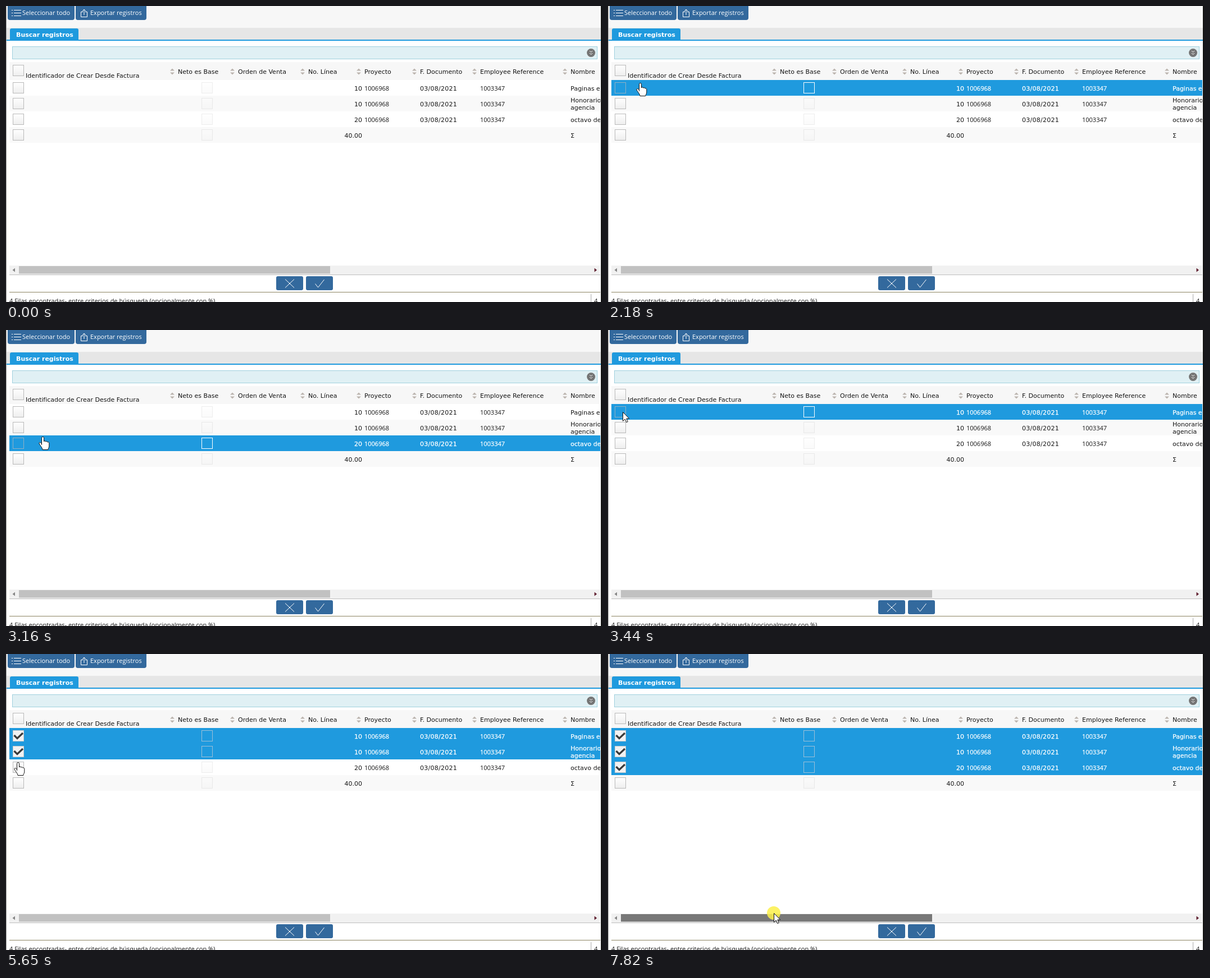
Write an HTML page that moves like this. It is 1061x528 px and loops after 8000 ms.

```html
<!DOCTYPE html>
<html lang="es">
<head>
<meta charset="utf-8">
<title>Buscar registros</title>
<style>
html, body { margin: 0; width: 100%; height: 100%; overflow: hidden; background: #fff; }
svg { display: block; width: 1061px; height: 528px; }
text { font: 11px "DejaVu Sans", sans-serif; fill: #151515; white-space: pre; }
text.ui { font-family: "Open Sans", sans-serif; }
text.white { fill: #fff; }
text.bold { font-weight: bold; }
.line { fill: none; stroke: #fff; }
.box { fill: url(#shade); stroke: #b9b9b9; }
.faint { opacity: .25; }
.check { fill: none; stroke: #3a3a3a; stroke-width: 3.2; visibility: hidden; }
.lit .bg { fill: #1f9ade; }
.lit text { fill: #fff; stroke: #fff; stroke-width: .25px; }
.lit .box { fill: none; stroke: #8fb0c4; }
.lit .faint { opacity: 1; stroke: #9cc0d8; }
.hover:not(.checked) .faint { stroke: #fff; }
.checked .main { fill: #f2f2f2; stroke: #ccc; }
.checked .check { visibility: visible; }
</style>
</head>
<body>
<svg viewBox="0 0 1061 528">
  <defs>
    <linearGradient id="shade" x2="0" y2="1">
      <stop stop-color="#fff"/><stop offset="1" stop-color="#eee"/>
    </linearGradient>
    <clipPath id="view"><path d="M0 0H1058V528H0Z"/></clipPath>
  </defs>
  <rect width="1061" height="528" fill="#fff"/>
  <rect width="1061" height="39" fill="#f7f7f7"/>
  <rect y="39" width="1061" height="22" fill="#e6e6e6"/>
  <rect y="60" width="1059" height="2" fill="#1f9ade"/>

  <g fill="#33699d">
    <rect x="3" y="-5" width="119" height="30" rx="4"/>
    <rect x="124" y="-5" width="126" height="30" rx="4"/>
    <rect x="481" y="482" width="48" height="25" rx="3"/>
    <rect x="534" y="482" width="48" height="25" rx="3"/>
  </g>
  <path class="line" d="M10 7.5h2m2 0h13M10 12.5h2m2 0h13M10 17.5h2m2 0h13"/>
  <path class="line" d="M137 10.5h-3.5v9h11v-9H141M139 16V6M135.5 9.5L139 6l3.5 3.5"/>
  <path class="line" d="M497 487.5l16 15m0-15l-16 15M550.5 495.5l5 6.5 11-14"/>
  <text class="ui white" x="29" y="16">Seleccionar todo</text>
  <text class="ui white" x="150" y="16">Exportar registros</text>

  <path d="M7 61V43q0-3 3-3H126q3 0 3 3V61Z" fill="#1f9ade"/>
  <text class="white bold" x="18" y="55">Buscar registros</text>
  <rect x="11.5" y="72.5" width="1041" height="22" fill="#e0f0f4" stroke="#a0d0de"/>
  <circle cx="1041.5" cy="83.5" r="7.5" fill="#757575"/>
  <path class="line" d="M1039 80l2.5 2.5 2.5-2.5m-5 4l2.5 2.5 2.5-2.5"/>

  <g id="table" clip-path="url(#view)"></g>

  <rect x="6" y="463" width="1052" height="16" fill="#f1f1f1"/>
  <rect id="thumb" x="23" y="464" width="554" height="13.5"/>
  <path d="M16 467.5v7l-4.5-3.5Z" fill="#858585"/>
  <path d="M1047.5 467.5v7l4.5-3.5Z" fill="#602030"/>
  <path d="M6 479.5H1058" stroke="#bdbdbd"/>
  <path d="M6 510.5H1058" stroke="#8b8460"/>
  <path d="M1041.5 514v14" stroke="#aaa"/>
  <text class="ui" x="6" y="530">4 Filas encontradas- entre criterios de búsqueda (opcionalmente con %)</text>
  <text class="ui" x="1047" y="530">4</text>
  <path d="M.5 0V528" stroke="#999"/>
  <rect x="1059" width="2" height="528" fill="#111"/>

  <g id="pointer">
    <circle id="glow" r="12" fill="#fcf04a" opacity=".85"/>
    <g fill="#fff" stroke="#111" stroke-linejoin="round">
      <path id="arrow" d="M.5 .5V16.5L4.2 13 6.7 18.7 9.2 17.6 6.8 12H11.7Z"/>
      <path id="hand" d="M-1.5 14V1.5a2 2 0 0 1 4 0V8c.3-1.8 3-1.6 3.3.4.5-1.2 3-.9 3.3.9.8-1 2.7-.5 2.7 1.5V16c0 3-2 4-2 6.5H0C0 19-6 13-6 11s2.5-2 4.5 1Z"/>
    </g>
  </g>
</svg>
<script>
const $ = id => document.getElementById(id);
const LOOP = 8000, STEP = 70, CLICK = 130;
const ROW_TOP = 132, ROW_HEIGHT = 28;

const label = (x, y, s, attrs = '') => `<text x="${x}" y="${y}" ${attrs}>${s}</text>`;
const box = (x, y, cls) =>
  `<rect class="box ${cls}" x="${x + .5}" y="${y + .5}" width="19" height="19"/>`;
const sorter = x => `<path d="M${x - 4} 115.5l4-4 4 4zm0 3l4 4 4-4z" fill="#bbb4ae"/>`;

const columns = { 'Neto es Base': 306, 'Orden de Venta': 413, 'No. Línea': 538,
  'Proyecto': 638, 'F. Documento': 737, 'Employee Reference': 844, 'Nombre': 1005 };
const header = '<rect x="6" y="100" width="1052" height="32" fill="#f7f7f7"/>' +
  box(12, 105, '') + label(35, 128, 'Identificador de Crear Desde Factura') +
  Object.entries(columns).map(([s, x]) => sorter(x - 10) + label(x, 121, s)).join('');

function row([number, ...names], i) {
  const y = ROW_TOP + ROW_HEIGHT * i, base = y + 19;
  const details = i < 3
    ? label(638, base, '1006968', 'class="ui"') +
      label(737, base, '03/08/2021', 'letter-spacing=".25"') +
      label(844, base, '1003347', 'class="ui"')
    : '';
  const nameTop = names.length > 1 ? base - 7 : base;
  return `<g class="row"><rect class="bg" x="6" y="${y}" width="1052" height="${ROW_HEIGHT}"
    fill="${i % 2 ? '#f9f9f9' : '#fff'}"/>` +
    box(12, y + 4, 'main') + box(348, y + 4, 'faint') +
    `<path class="check" d="M14.5 ${y + 13}l5.5 5.5L30 ${y + 9}"/>` +
    label(634, base, number, 'text-anchor="end"') + details +
    names.map((s, n) => label(1005, nameTop + 13 * n, s)).join('') + '</g>';
}
$('table').innerHTML = header + [['10', 'Paginas en'], ['10', 'Honorarios', 'agencia'],
  ['20', 'octavo de'], ['40.00', 'Σ']].map(row).join('');
const rows = [...document.querySelectorAll('.row')];

// Pointer moves; it rests between them.
const entry = { x: 1045, y: 515 };
const moves = [
  { start: 570, end: 1110, x: 390, y: 304 },
  { start: 1510, end: 1780, x: 101, y: 170 },
  { start: 2060, end: 2400, x: 21, y: 112 },
  { start: 2530, end: 2810, x: 21, y: 147 },
  { start: 2880, end: 3160, x: 65, y: 191 },
  { start: 3230, end: 3580, x: 21, y: 140 },
  { start: 4300, end: 4790, x: 21, y: 172 },
  { start: 5390, end: 5720, x: 21, y: 198 },
  { start: 6530, end: 6740, x: 259, y: 422 },
  { start: 7070, end: 7420, x: 295, y: 462 }
];
const clicks = [4020, 5060, 6070, 7820];

function pointerAt(t) {
  const i = moves.findLastIndex(m => m.start <= t);
  if (i < 0) return entry;
  const from = moves[i - 1] || entry, { start, end, x, y } = moves[i];
  const steps = Math.round((end - start) / STEP);
  const step = Math.floor((t - start) / (end - start) * steps + .1);
  const k = Math.min(1, (step + 1) / (steps + 1));
  // Slow, even moves down the checkbox column; the others ease out.
  const p = from.x === x ? k : 1 - (1 - k) ** 2;
  return { x: Math.round(from.x + (x - from.x) * p), y: Math.round(from.y + (y - from.y) * p) };
}

const show = (el, on) => { el.style.display = on ? '' : 'none'; };

function draw() {
  const t = performance.now() % LOOP;
  const { x, y } = pointerAt(t);

  // Hover reacts one step late.
  const late = pointerAt(t - STEP);
  const hover = Math.floor((late.y - ROW_TOP) / ROW_HEIGHT);
  const inRow = late.y - ROW_TOP - hover * ROW_HEIGHT;
  const onBox = Math.abs(late.x - 22) <= 10 && Math.abs(inRow - 14) <= 10;
  const hand = hover >= 0 && hover < 3 && !onBox;

  rows.forEach((el, i) => {
    const checked = i < 3 && t >= clicks[i] + CLICK;
    el.classList.toggle('checked', checked);
    el.classList.toggle('hover', hover === i);
    el.classList.toggle('lit', checked || hover === i);
  });

  $('pointer').setAttribute('transform', `translate(${x} ${y})`);
  show($('pointer'), t >= moves[0].start);
  show($('hand'), hand);
  show($('arrow'), !hand);

  const last = clicks.at(-1);
  show($('glow'), t >= last || clicks.some(c => t >= c && t < c + CLICK));
  $('thumb').setAttribute('fill', t >= last ? '#787878' : late.y > 460 && late.y < 478 ? '#a8a8a8' : '#c1c1c1');
  requestAnimationFrame(draw);
}
draw();
</script>
</body>
</html>
```
